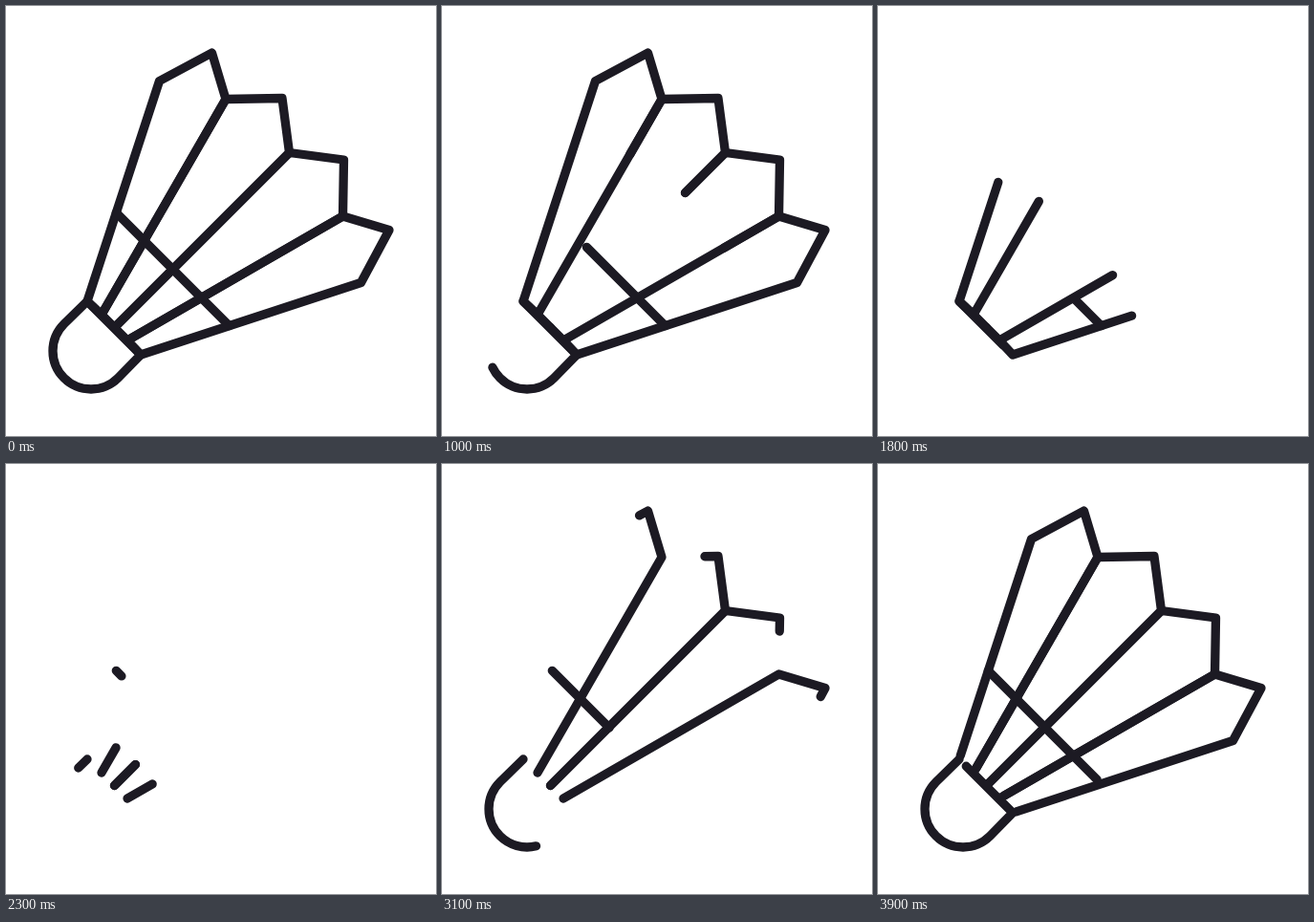
Recreate the animation shown at these times as an HTML page with a canvas. Size 450 px wide and 450 px high, loop 4 s.

```html
<!DOCTYPE html>
<html lang="en">
<head>
<meta charset="utf-8">
<title>Shuttlecock</title>
<style>
html, body { margin: 0; width: 100%; height: 100%; overflow: hidden; background: #fff; }
canvas { display: block; width: 450px; height: 450px; }
</style>
</head>
<body>
<canvas id="stage" width="450" height="450"></canvas>
<script>
const ctx = document.getElementById('stage').getContext('2d');
const LOOP = 4000, STEP = 100;
const ERASE_AT = 467, DRAW_AT = 2217, SPAN = 1750;

// The shuttlecock is symmetric about the line x + y = 450.
const mirror = pts => pts.map(([x, y]) => [450 - y, 450 - x]);

function polyline(pts) {
  const path = new Path2D();
  let length = 0;
  pts.forEach(([x, y], i) => {
    if (i === 0) return path.moveTo(x, y);
    path.lineTo(x, y);
    length += Math.hypot(x - pts[i - 1][0], y - pts[i - 1][1]);
  });
  return { path, length };
}

function corkShape() {
  const cx = 89, cy = 361, r = 40;
  const top = [85, 309], low = [141, 365];
  const path = new Path2D();
  path.moveTo(...top);
  path.arc(cx, cy, r, Math.PI * 1.25, Math.PI * 0.25, true);
  path.lineTo(...low);
  path.lineTo(...top);
  const k = r * Math.SQRT1_2;
  const side = Math.hypot(cx - k - top[0], cy - k - top[1]);
  const base = Math.hypot(low[0] - top[0], low[1] - top[1]);
  return { path, length: 2 * side + Math.PI * r + base };
}

const outer = [[100, 323], [230, 97.5], [215.5, 49], [160.5, 78.5], [85, 309], [100, 323]];
const inner = [[113.5, 336.5], [296.5, 153.5], [289, 96.5], [230, 97.5], [100, 323], [113.5, 336.5]];
const shapes = [
  ...[outer, inner, mirror(inner), mirror(outer)].map(polyline),
  polyline([[115.3, 216.3], [233.7, 334.7]]),
  corkShape()
];

const clamp = v => Math.min(1, Math.max(0, v));

function trim({ path, length }, from, to) {
  if (to <= from) return;
  if (from === 0 && to === 1) {
    ctx.setLineDash([]);
  } else {
    ctx.setLineDash([(to - from) * length, length * 2]);
    ctx.lineDashOffset = -from * length;
  }
  ctx.stroke(path);
}

function draw(t) {
  ctx.fillStyle = '#fff';
  ctx.fillRect(0, 0, 450, 450);
  ctx.strokeStyle = '#1c1a23';
  ctx.lineWidth = 9.3;
  ctx.lineCap = ctx.lineJoin = 'round';
  const erasing = t < DRAW_AT;
  const from = erasing ? clamp((t - ERASE_AT) / SPAN) : 0;
  const to = erasing ? 1 : clamp((t - DRAW_AT) / SPAN);
  shapes.forEach(s => trim(s, from, to));
}

function tick(now) {
  // Ten poses per second; the small lead absorbs timer jitter.
  draw(Math.floor((now + 10) / STEP) * STEP % LOOP);
  requestAnimationFrame(tick);
}

draw(0);
requestAnimationFrame(tick);
</script>
</body>
</html>
```
